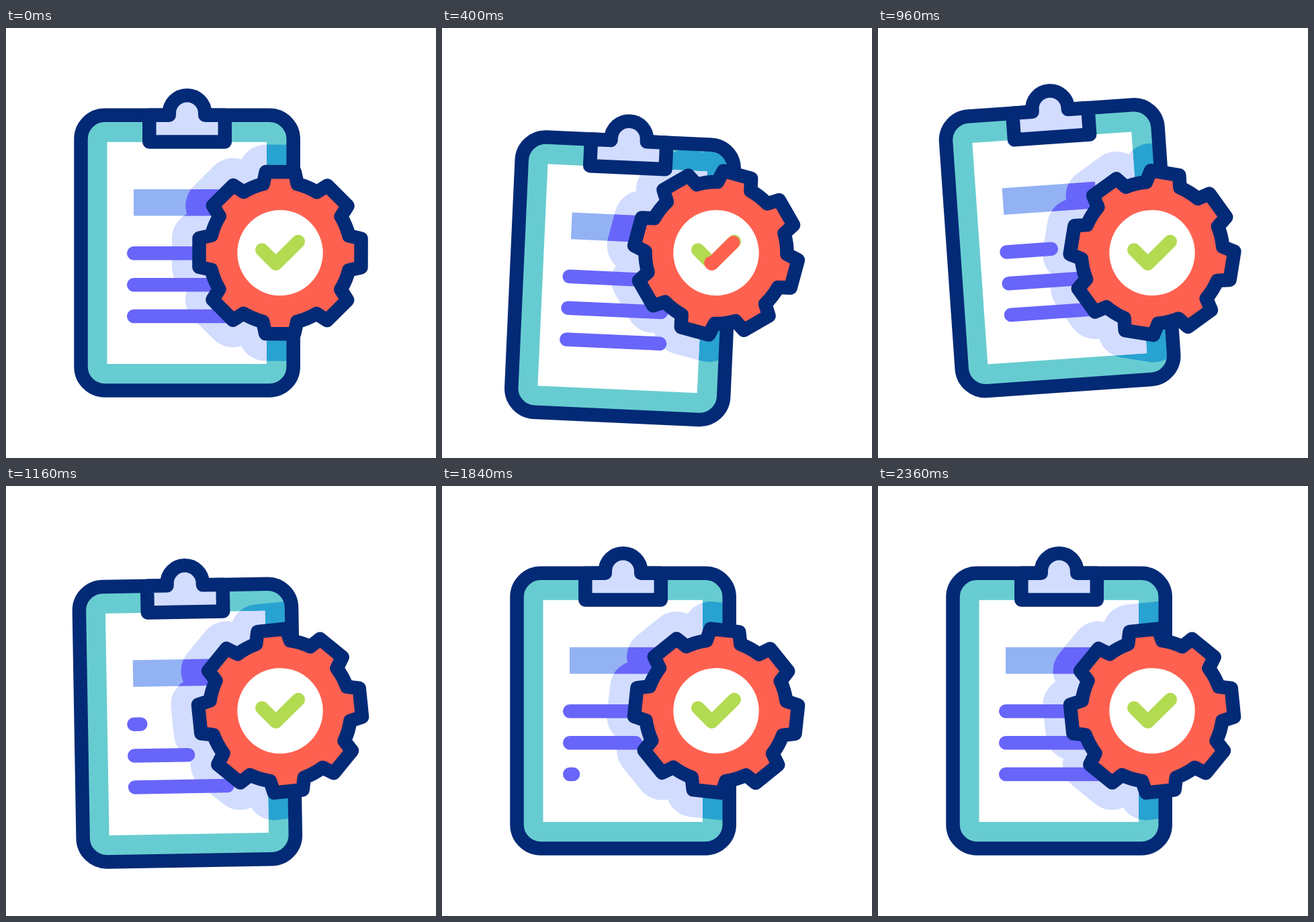
Recreate the animation shown at these times as an HTML page with a canvas. Size 640x640 px, loop 2.4 s.

```html
<!DOCTYPE html>
<html lang="en">
<head>
<meta charset="utf-8">
<title>Clipboard and gear</title>
<style>
  html, body { margin: 0; width: 100%; height: 100%; overflow: hidden; background: #fff; }
  canvas { display: block; width: 640px; height: 640px; }
</style>
</head>
<body>
<canvas id="stage" width="640" height="640"></canvas>
<script>
const ctx = document.getElementById('stage').getContext('2d');
const LOOP = 2400, LINE = 20.5, RAD = Math.PI / 180;
const NAVY = '#032a76', TEAL = '#67ccd1', BLUE = '#28a2d0', PALE = '#d2dcfe',
      RED = '#ff6150', GREEN = '#b2db52', PURPLE = '#6865fa', SKY = '#93b2f4';

const box = (x, y, w, h, r = 0) => {
  const path = new Path2D();
  path.roundRect(x, y, w, h, r);
  return path;
};
const board = box(111.5, 129.8, 316.2, 409.6, 35.5);
const paper = box(150.5, 169.7, 237.5, 330.3);
const bar = box(190, 240, 138.5, 39.6);
const clip = new Path2D('M213.3 129.8H242.8V127A26.7 26.7 0 0 1 296.2 127V129.8H325.8V169.4H213.3Z');
const disc = new Path2D();
disc.arc(0, 0, 63.7, 0, 7);
const gear = makeGear();

// Eight teeth, joined by arcs along the root circle
function makeGear() {
  const path = new Path2D(), root = 105.5, tip = 122.4;
  for (let i = 0; i < 8; i++) {
    const at = deg => (i * 45 + deg) * RAD;
    path.arc(0, 0, root, at(-31), at(-14));
    for (const deg of [-10.1, 10.1]) path.lineTo(tip * Math.cos(at(deg)), tip * Math.sin(at(deg)));
  }
  path.closePath();
  return path;
}

function ease(t, start, length) {
  const s = Math.min(1, Math.max(0, (t - start) / length));
  return s * s * (3 - 2 * s);
}

// Eased value through [time, value] keys
function track(t, keys) {
  let value = keys[0][1];
  for (let i = 1; i < keys.length; i++) {
    const [t0, v0] = keys[i - 1], [t1, v1] = keys[i];
    value += (v1 - v0) * ease(t, t0, t1 - t0);
  }
  return value;
}

function fill(path, color) {
  ctx.fillStyle = color;
  ctx.fill(path);
}

function stroke(path, color, width = LINE) {
  ctx.strokeStyle = color;
  ctx.lineWidth = width;
  ctx.stroke(path);
}

function poseBoard(t) {
  const y = track(t, [[0, 0], [360, 40.3], [760, -33], [1160, 18], [1560, 0]]);
  const angle = track(t, [[160, 0], [560, 4], [960, -4], [1360, 2], [1760, 0]]);
  ctx.setTransform(1, 0, 0, 1, 269.5, 320 + y);
  ctx.rotate(angle * RAD);
  ctx.translate(-269.5, -320);
}

function poseGear(t) {
  ctx.setTransform(1, 0, 0, 1, 408, 334.6);
  ctx.rotate(t / LOOP * 360 * RAD);
}

// Shadow of the gear, limited to one part of the clipboard
function shade(t, area, color) {
  ctx.save();
  poseBoard(t);
  ctx.clip(area);
  poseGear(t);
  fill(gear, color);
  stroke(gear, color, 81);
  ctx.restore();
}

function drawBoard(t) {
  for (const [area, base, shadow] of [[board, TEAL, BLUE], [paper, '#fff', PALE], [bar, SKY, PURPLE]]) {
    poseBoard(t);
    fill(area, base);
    shade(t, area, shadow);
  }
  poseBoard(t);
  for (let i = 0; i < 3; i++) {
    const size = 1 - ease(t, 642 + 240 * i, 620) + ease(t, 1374 + 211 * i, 400);
    const y = 335.3 + 46.9 * i;
    stroke(new Path2D(`M190.2 ${y}h${Math.max(0.01, 139 * size)}`), PURPLE);
  }
  stroke(board, NAVY);
  fill(clip, PALE);
  stroke(clip, NAVY);
}

function drawCheck(t) {
  const points = [[381, 330.2], [401.6, 351], [435, 317.8]];
  const trim = (from, to, color) => {
    const path = new Path2D(), bend = 0.383;
    const point = s => {
      const [a, b, k] = s < bend
        ? [points[0], points[1], s / bend]
        : [points[1], points[2], (s - bend) / (1 - bend)];
      return [a[0] + (b[0] - a[0]) * k, a[1] + (b[1] - a[1]) * k];
    };
    path.moveTo(...point(from));
    if (from < bend && to > bend) path.lineTo(...points[1]);
    path.lineTo(...point(to));
    stroke(path, color, 20);
  };
  trim(0, 1, GREEN);
  const head = ease(t, 40, 400), tail = ease(t, 240, 400);
  if (head > tail) trim(tail, head, RED);
}

function draw(t) {
  ctx.resetTransform();
  ctx.clearRect(0, 0, 640, 640);
  ctx.lineCap = ctx.lineJoin = 'round';
  drawBoard(t);
  poseGear(t);
  fill(gear, RED);
  stroke(gear, NAVY);
  fill(disc, '#fff');
  ctx.resetTransform();
  drawCheck(t);
}

const begin = performance.now();
function tick() {
  draw((performance.now() - begin) % LOOP);
  requestAnimationFrame(tick);
}
tick();
</script>
</body>
</html>
```
